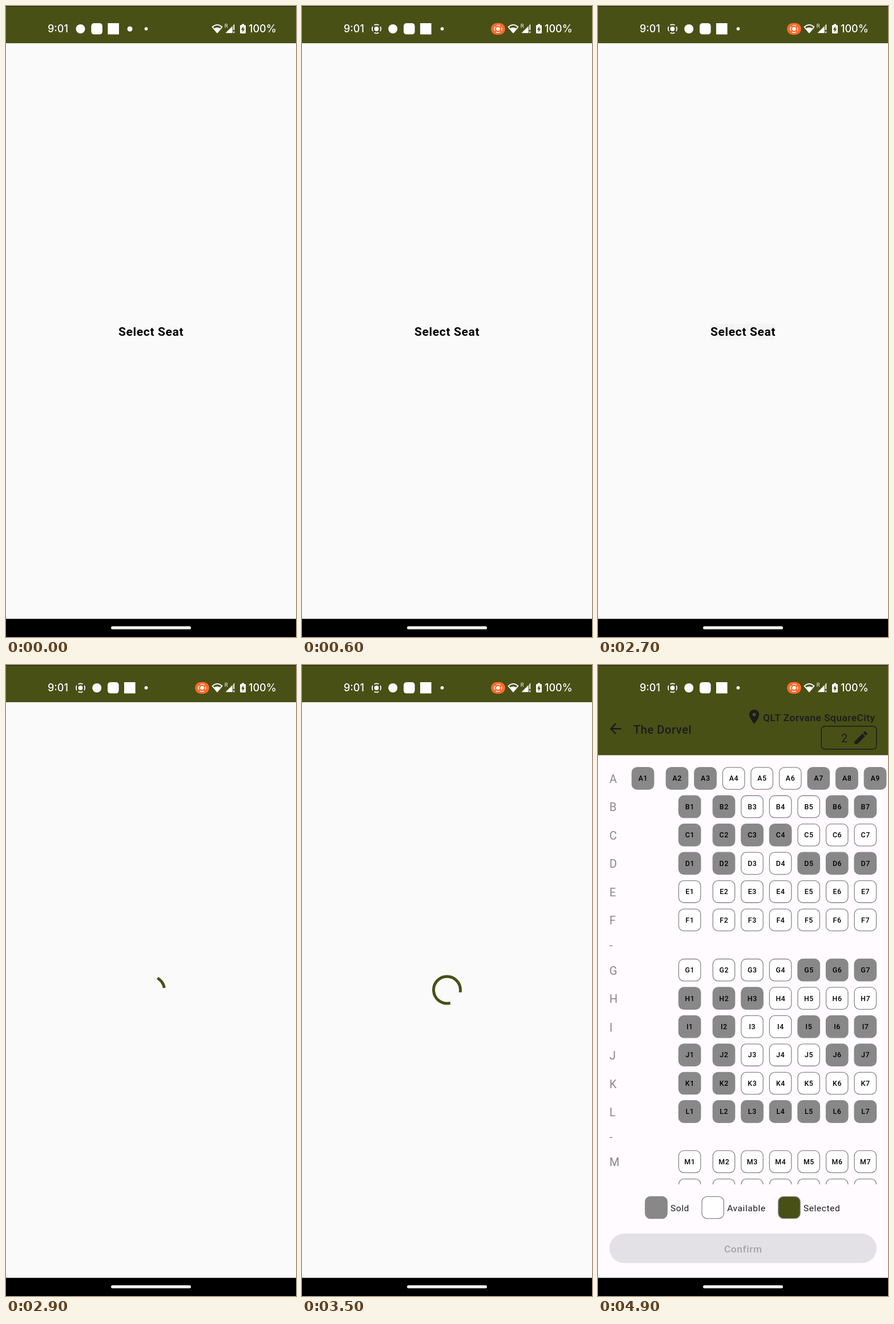
Animation of 508x1102 px, one loop 6000 ms. Source, as an HTML page:

```html
<!DOCTYPE html>
<html lang="en">
<head>
<meta charset="utf-8">
<title>Seat picker</title>
<style>
  html, body { margin: 0; width: 100%; height: 100%; overflow: hidden; background: #fafafa; }
  svg { display: block; width: 100%; height: 100%; }
  text { font-family: Roboto, sans-serif; white-space: pre; }
  .clock { font: 500 18px Inter, sans-serif; fill: #fff; }
  .cta { font-size: 21px; font-weight: 700; letter-spacing: .65px; }
  .head { font-weight: 500; fill: #1b1b1f; }
  .row { font-size: 20px; fill: #888; }
  .seat { font-size: 12.4px; font-weight: 500; letter-spacing: .6px; text-anchor: middle; fill: #000; }
  .key { font-size: 15.5px; letter-spacing: .6px; fill: #1b1b1f; }
</style>
</head>
<body>
<svg viewBox="0 0 508 1102" preserveAspectRatio="none" xmlns="http://www.w3.org/2000/svg">
  <defs>
    <g id="rec">
      <circle r="3.9" fill="#fff"/>
      <circle r="7.6" fill="none" stroke="#fff" stroke-width="1.7" pathLength="8" stroke-dasharray="1.4 .6" stroke-dashoffset=".7"/>
    </g>
    <clipPath id="list"><rect y="158" width="508" height="749"/></clipPath>
    <clipPath id="label"><rect x="197" y="555" width="114" height="28"/></clipPath>
  </defs>

  <rect width="508" height="1102" fill="#fafafa"/>

  <g id="home">
    <circle id="ripple" cx="262" cy="573" fill="#000" clip-path="url(#label)"/>
    <text class="cta" x="197" y="576">Select Seat</text>
    <circle id="touch" cx="262" cy="573.5" r="14.5" fill="#fff" fill-opacity=".62" stroke="#cfcfd8" stroke-opacity=".85" stroke-width="2.6"/>
  </g>

  <path id="spin" fill="none" stroke="#485016" stroke-width="5" stroke-linecap="square"/>

  <g id="seats">
    <rect y="65" width="508" height="1006" fill="#fffbff"/>
    <rect y="60" width="508" height="97.5" fill="#485016"/>
    <g fill="#1b1b1f">
      <path transform="translate(15.7 96.4) scale(1.236)" d="M20 11H7.83l5.59-5.59L12 4l-8 8 8 8 1.41-1.41L7.83 13H20z"/>
      <path transform="translate(258.8 75.5) scale(1.236)" fill-rule="evenodd" d="M12 2C8.13 2 5 5.13 5 9c0 5.25 7 13 7 13s7-7.75 7-13c0-3.87-3.13-7-7-7zm0 9.5a2.5 2.5 0 1 1 0-5 2.5 2.5 0 0 1 0 5z"/>
      <path transform="translate(445.8 112.2) scale(1.236)" d="M3 17.25V21h3.75L17.81 9.94l-3.75-3.75zM20.71 7.04c.39-.39.39-1.02 0-1.41l-2.34-2.34c-.39-.39-1.02-.39-1.41 0l-1.83 1.83 3.75 3.75z"/>
    </g>
    <text class="head" x="62" y="119.5" font-size="20" letter-spacing=".6">The Dorvel</text>
    <text class="head" x="289" y="97.5" font-size="17.3" letter-spacing=".5">QLT Zorvane SquareCity</text>
    <rect x="391.2" y="107" width="96.6" height="40" rx="6" fill="none" stroke="#1b1b1f" stroke-width="1.4"/>
    <text x="426" y="135" font-size="20" fill="#1b1b1f">2</text>
    <g id="grid" clip-path="url(#list)"></g>
    <g id="legend"></g>
    <rect x="20" y="993" width="468" height="51.5" rx="25.7" fill="#e3e1e5"/>
    <text x="254.3" y="1026" text-anchor="middle" font-size="17.3" font-weight="500" letter-spacing=".6" fill="#a5a3a7">Confirm</text>
  </g>

  <g id="bar">
    <rect width="508" height="65" fill="#485016"/>
    <rect width="508" height="1.2" fill="#262a1c"/>
    <text class="clock" x="73" y="46">9:01</text>
    <use id="recIcon" href="#rec" x="130.5" y="40"/>
    <g id="notes" fill="#fff">
      <circle cx="130.5" cy="40" r="8"/>
      <rect x="149.3" y="30" width="19.6" height="19.6" rx="5"/>
      <rect x="178.3" y="30" width="19.6" height="19.6"/>
    </g>
    <circle id="extra" cx="217" cy="40" r="4.5" fill="#fff"/>
    <circle cx="245.5" cy="39.8" r="2.9" fill="#fff"/>
    <g id="chip">
      <rect x="-12.3" y="-10.2" width="24.6" height="20.4" rx="9.8" fill="#ff6a2b"/>
      <use href="#rec" transform="scale(.84)"/>
    </g>
    <g fill="#fff">
      <path d="M361.5 36.6Q370 29 378.5 36.6L370 46.6Z" fill="none" stroke="#fff" stroke-width="1.7" stroke-linejoin="round"/>
      <path d="M363.6 39.6Q370 35.4 376.4 39.6L370 47Z"/>
      <path d="M384.5 47.2L396.8 35V47.2Z"/>
      <path d="M398.2 33.2L400.2 31.6V42H398.2ZM398.2 44.4H400.2V47.2H398.2Z"/>
      <text x="382.7" y="38.4" font-size="9.5">R</text>
      <path d="M413 31.4H417V33.2H418.6Q420 33.2 420 34.6V46.6Q420 48 418.6 48H411.4Q410 48 410 46.6V34.6Q410 33.2 411.4 33.2H413Z"/>
      <path d="M415.9 35.2L411.9 41.4H414.3V46L418.2 39.7H415.9Z" fill="#485016"/>
    </g>
    <text class="clock" x="425" y="46">100%</text>
  </g>

  <rect y="1070.3" width="508" height="32" fill="#000"/>
  <rect x="184" y="1083.2" width="140" height="5.4" rx="2.7" fill="#f4f4f4"/>
</svg>
<script>
const LOOP = 6000, STEP = 100;
const $ = id => document.getElementById(id);
const show = (id, on) => $(id).setAttribute('display', on ? 'inline' : 'none');
const set = (id, attrs) => { for (const k in attrs) $(id).setAttribute(k, attrs[k]); };
const clamp = x => Math.min(1, Math.max(0, x));

const box = (cx, cy, fill) =>
  `<rect x="${cx - 19.2}" y="${cy - 19.2}" width="38.4" height="38.4" rx="9" fill="${fill}" stroke="#888" stroke-width="1.3"/>`;

// One word per row: 1 = sold, 0 = available; '-' is an aisle.
const PLAN = ('A111000111 B1100011 C1111000 D1100111 E0000000 F0000000 - ' +
  'G0000111 H1110000 I1100111 J1100011 K1100000 L1111111 - M0000000 N0000000').split(' ');

function buildGrid() {
  let y = 198, out = '';
  for (const row of PLAN) {
    const name = row[0];
    if (name === '-') {
      out += `<text class="row" x="20" y="${y + 1.5}">-</text>`;
      y += 38;
      continue;
    }
    out += `<text class="row" x="20" y="${y + 8}">${name}</text>`;
    const left = name === 'A' ? 78.6 : 160.6;
    [...row.slice(1)].forEach((sold, i) => {
      const x = left + i * 49.57 + (i ? 10.3 : 0);
      out += box(x, y, +sold ? '#888' : '#fff') +
        `<text class="seat" x="${x + .3}" y="${y + 4.4}">${name}${i + 1}</text>`;
    });
    y += 49.45;
  }
  $('grid').innerHTML = out;
}

function buildLegend() {
  const items = [[102, '#888', 'Sold'], [201.2, '#fff', 'Available'], [335, '#485016', 'Selected']];
  $('legend').innerHTML = items.map(([x, fill, word]) =>
    box(x, 947.5, fill) + `<text class="key" x="${x + 25}" y="953.7">${word}</text>`).join('');
}

// cubic-bezier(.4, 0, .2, 1)
function ease(x) {
  x = clamp(x);
  let lo = 0, hi = 1;
  for (let i = 0; i < 24; i++) {
    const u = (lo + hi) / 2, v = 1 - u;
    if (1.2 * v * v * u + .6 * v * u * u + u * u * u < x) lo = u; else hi = u;
  }
  return 3 * (1 - lo) * lo * lo + lo ** 3;
}

// Indeterminate ring: the head sweeps 290 degrees, then the tail catches up.
function spinner(t) {
  const cycle = 1332, r = 23.5;
  const head = 290 * ease(t / 666), tail = 290 * ease((t - 666) / 666);
  const from = -90 + 286 * t / cycle + 6 + tail;
  const sweep = Math.max(head - tail, .1);
  const at = deg => {
    const a = deg * Math.PI / 180;
    return `${254 + r * Math.cos(a)} ${567.5 + r * Math.sin(a)}`;
  };
  set('spin', { d: `M${at(from)}A${r} ${r} 0 ${sweep > 180 ? 1 : 0} 1 ${at(from + sweep)}` });
}

function statusIcons(t) {
  const p = ease(t / 600);
  set('notes', { transform: `translate(${28.7 * p} 0)` });
  set('recIcon', { opacity: p });
  set('extra', { opacity: clamp(1 - 2 * p) });
  set('chip', { opacity: p, transform: `translate(343.5 40) scale(${.4 + .6 * p})` });
}

function tap(t) {
  show('touch', t >= 2200 && t < 2400);
  const grow = ease((t - 2200) / 300);
  set('ripple', {
    r: 30 + 45 * grow,
    opacity: t >= 2300 && t < 2800 ? .08 - .06 * clamp((t - 2400) / 300) : 0
  });
}

function draw(time) {
  const t = Math.floor(time % LOOP / STEP) * STEP;
  show('home', t < 2900);
  show('spin', t >= 2900 && t < 4900);
  show('seats', t >= 4900);
  statusIcons(t);
  tap(t);
  spinner(Math.min(Math.max(t, 2900), 3900) - 2765);
}

buildGrid();
buildLegend();
const start = performance.now();
function tick() {
  draw(performance.now() - start);
  requestAnimationFrame(tick);
}
tick();
</script>
</body>
</html>
```
